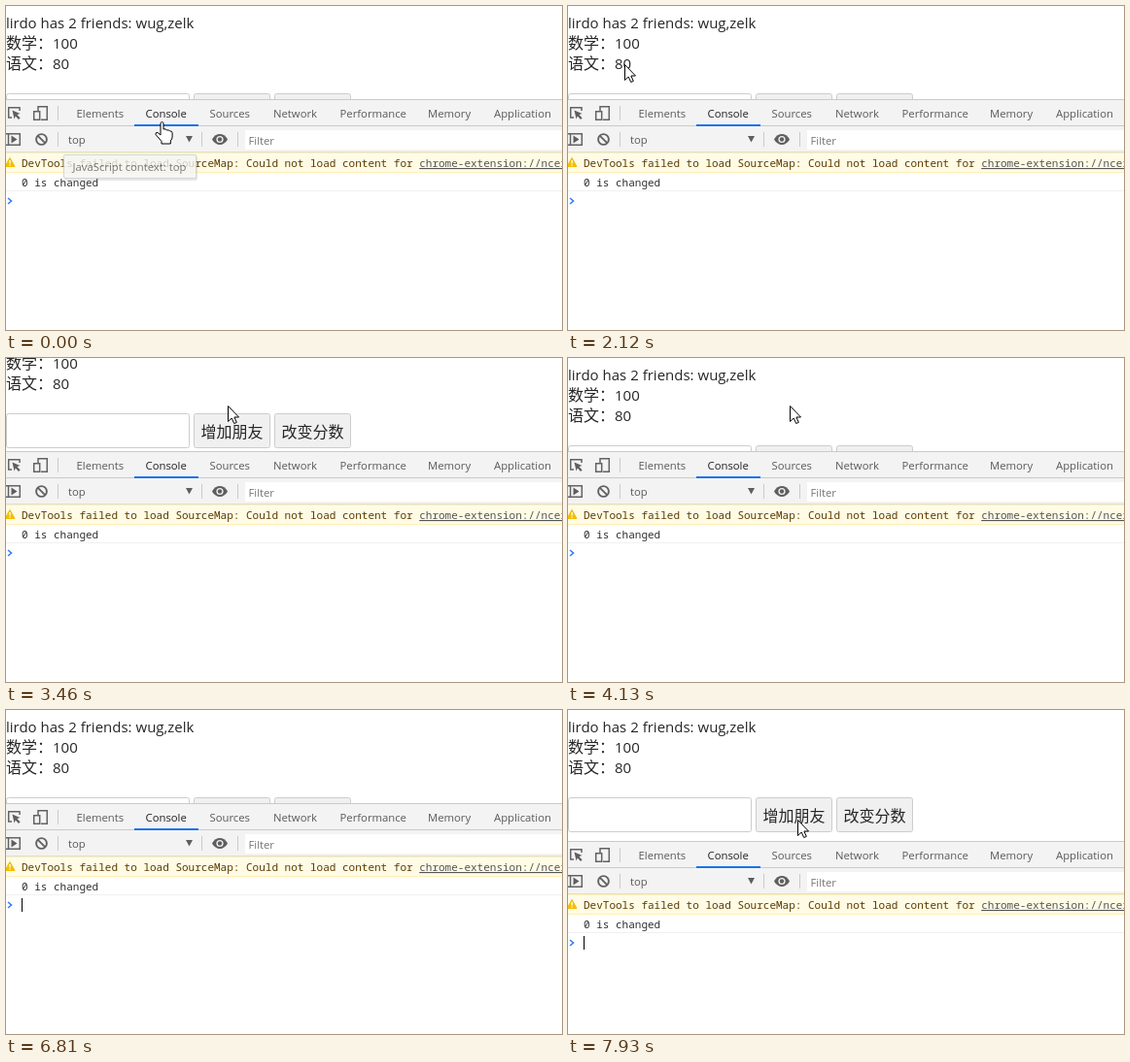
An HTML page that plays this animation: 572 by 334 pixels, repeating every 8 s.

```html
<!DOCTYPE html>
<html lang="zh-CN">
<head>
<meta charset="utf-8">
<title>Console demo</title>
<style>
html, body { margin: 0; width: 100%; height: 100%; overflow: hidden; background: #fff; }
svg { display: block; width: 572px; height: 334px; }
text { white-space: pre; }

.page { font: 15px "Open Sans", sans-serif; fill: #262626; }
.cjk { font: 16px "Noto Sans CJK SC", "Noto Sans CJK", sans-serif; }
.ui { font: 11.3px "Open Sans", sans-serif; fill: #5a5a5a; }
.log { font: 11px "Noto Sans Mono", monospace; fill: #303030; }
.line { fill: none; stroke: #636363; stroke-width: 1.5; }
.field { fill: #fff; stroke: #ccc; }
.button { fill: #f0f0f0; stroke: #ccc; }

.scroll, .panel, .caret, .tip, .tab-app, .tab-perf, .mouse, .arrow, .hand, .beam {
  animation: 8s step-end infinite;
}
.scroll { animation-name: scroll; }
.panel { animation-name: panel; }
.caret { animation-name: caret; }
.tip { animation-name: tip; }
.tab-app { animation-name: tab-app; }
.tab-perf { animation-name: tab-perf; }
.mouse { animation-name: mouse; }
.arrow { animation-name: arrow; }
.hand { animation-name: hand; }
.beam { animation-name: beam; }

@keyframes scroll {
  0%, 51.625% { transform: translateY(0); }
  41.625% { transform: translateY(-15px); }
  43.25% { transform: translateY(-33px); }
  45.125% { transform: translateY(-36px); }
  50.125% { transform: translateY(-14px); }
}
@keyframes panel {
  0% { transform: translateY(0); }
  87% { transform: translateY(21px); }
  88.875% { transform: translateY(37px); }
  90.5%, 100% { transform: translateY(39px); }
}
@keyframes caret {
  0%, 90.5% { visibility: hidden; }
  85.125%, 97.625%, 100% { visibility: visible; }
}
@keyframes tip {
  0% { opacity: .8; transform: none; }
  1.5% { opacity: .45; transform: none; }
  3% { opacity: .18; transform: none; }
  4.5% { opacity: 0; transform: translateY(4px); }
  29.625% { opacity: .5; transform: translateY(4px); }
  31% { opacity: .9; transform: translateY(4px); }
  32.875%, 100% { opacity: 0; transform: none; }
}
@keyframes tab-app {
  0%, 69.125%, 95.75% { fill: #5a5a5a; }
  67.25%, 94.25% { fill: #333; }
}
@keyframes tab-perf {
  0%, 97.625% { fill: #5a5a5a; }
  95.75% { fill: #333; }
}
@keyframes mouse {
  0% { transform: translate(160px, 119px); }
  1.5% { transform: translate(152px, 110px); }
  3% { transform: translate(122px, 74px); }
  4.5% { transform: translate(105px, 57px); }
  6.375% { transform: translate(103px, 56px); }
  8.25% { transform: translate(103px, 61px); }
  9.75% { transform: translate(102px, 67px); }
  14.75% { transform: translate(93px, 67px); }
  16.25% { transform: translate(70px, 66px); }
  18.125% { transform: translate(48px, 52px); }
  19.625% { transform: translate(33px, 41px); }
  23.5% { transform: translate(40px, 26px); }
  25% { transform: translate(58px, 60px); }
  26.625% { transform: translate(72px, 112px); }
  28.125% { transform: translate(77px, 134px); }
  29.625% { transform: translate(78px, 138px); }
  31% { transform: translate(76px, 188px); }
  32.875% { transform: translate(76px, 207px); }
  34.375% { transform: translate(135px, 196px); }
  36.25% { transform: translate(235px, 85px); }
  38.125% { transform: translate(228px, 49px); }
  62.125% { transform: translate(290px, 80px); }
  63.875% { transform: translate(328px, 89px); }
  65.75% { transform: translate(425px, 88px); }
  67.25% { transform: translate(530px, 110px); }
  94.25% { transform: translate(540px, 155px); }
  95.75% { transform: translate(309px, 162px); }
  97.625% { transform: translate(262px, 130px); }
  99.125%, 100% { transform: translate(236px, 113px); }
}
@keyframes arrow {
  0%, 31%, 69.125% { visibility: hidden; }
  3%, 36.25%, 94.25%, 100% { visibility: visible; }
}
@keyframes hand {
  0% { visibility: visible; }
  3%, 100% { visibility: hidden; }
}
@keyframes beam {
  0%, 36.25%, 100% { visibility: hidden; }
  31% { visibility: visible; }
}
</style>
</head>
<body>
<svg viewBox="0 0 572 334">
  <g class="page">
    <g class="scroll">
      <text x="0" y="23">lirdo has 2 friends: wug,zelk</text>
      <text x="0" y="44"><tspan class="cjk">数学：</tspan>100</text>
      <text x="0" y="65"><tspan class="cjk">语文：</tspan>80</text>
      <rect class="field" x=".5" y="90.5" width="188" height="35" rx="2"/>
      <rect class="button" x="193.5" y="90.5" width="78" height="35" rx="2"/>
      <rect class="button" x="276.5" y="90.5" width="78" height="35" rx="2"/>
      <text class="cjk" x="200.5" y="115">增加朋友</text>
      <text class="cjk" x="283.5" y="115">改变分数</text>
    </g>
  </g>

  <g class="panel">
    <path fill="#fff" d="M0 96h572v260H0z"/>
    <path fill="#f3f3f3" d="M0 96h572v55H0z"/>
    <path fill="#cacaca" d="M0 96h572v1H0zM0 123h572v1H0zM53 103h1v15h-1zM53 130h1v15h-1zM201 130h1v15h-1zM238 130h1v15h-1z"/>
    <path fill="#fff" d="M246 128h326v20H246z"/>
    <path fill="#ddd" d="M0 150h572v1H0z"/>
    <path fill="#1a73e8" d="M132 122h66v2h-66z"/>

    <g class="line">
      <path d="M6 115H2.7V104.7H14V108"/>
      <path d="M33 108V103.7H42.3V117.3H36M28.7 108.7h6v8.6h-6z"/>
      <path d="M-1 131.7H14.3V143.3H-1M2.5 131.7V143.3"/>
      <g stroke-width="1.9">
        <circle cx="36.5" cy="137.5" r="5.4"/>
        <path d="M32.6 133.6l7.8 7.8"/>
      </g>
    </g>
    <g fill="#5e5e5e">
      <path d="M6.5 107.5l8 3.4-3.1 1.2 3.2 3.4-1.6 1.5-3.2-3.4-1.3 3z"/>
      <path d="M5.5 133.5l6 4-6 4z"/>
      <path d="M185 134h7l-3.5 6.5z"/>
      <path d="M212 137.5c4-7.3 12-7.3 16 0c-4 7.3-12 7.3-16 0z"/>
    </g>
    <circle cx="220" cy="137.5" r="3.6" fill="#f3f3f3"/>
    <circle cx="220" cy="137.5" r="2.2" fill="#5e5e5e"/>

    <g class="ui">
      <text x="72.5" y="115">Elements</text>
      <text x="143.5" y="115" fill="#222">Console</text>
      <text x="209.5" y="115">Sources</text>
      <text x="275" y="115">Network</text>
      <text class="tab-perf" x="343.5" y="115">Performance</text>
      <text x="434" y="115">Memory</text>
      <text class="tab-app" x="502" y="115">Application</text>
      <text x="64" y="142">top</text>
      <text x="249.5" y="143" fill="#757575">Filter</text>
    </g>

    <path fill="#fffbe5" d="M0 151h572v21H0z"/>
    <path fill="#fff0b3" d="M0 151h572v1H0zM0 171h572v1H0z"/>
    <path fill="#f0f0f0" d="M0 190h572v1H0z"/>
    <path d="M4 156.500l5 9H-1z" fill="#f4bd00" stroke="#f4bd00" stroke-linejoin="round"/>
    <path fill="#fff" d="M3.400 159h1.300v3.500H3.400zM3.400 163.500h1.300v1.300H3.400z"/>
    <g class="log">
      <text x="16" y="166" fill="#5c3c00">DevTools failed to load SourceMap: Could not load content for <tspan fill="#545454" text-decoration="underline">chrome-extension://ncer</tspan></text>
      <text x="16" y="186">0 is changed</text>
    </g>
    <path d="M2 198l3.5 3-3.5 3" fill="none" stroke="#367cf1" stroke-width="1.6"/>
    <path class="caret" fill="#000" d="M16 194h1v14h-1z"/>
  </g>

  <g class="tip">
    <rect x="60" y="154" width="137" height="26" rx="2" fill="#000" opacity=".12"/>
    <rect x="59.5" y="153.5" width="136" height="24" rx="1.500" fill="#f5f5f5" stroke="#ccc"/>
    <text class="ui" x="68.5" y="170">JavaScript context: top</text>
  </g>

  <g class="mouse">
    <path class="arrow" d="M.5.5V16.500L4.200 13 6.700 18.500 9.300 17.400 6.900 12H11.500Z" fill="#fff" stroke="#000"/>
    <path class="hand" d="M-1 1.500q1.500-2 3 0V8q3-.8 3.300 1 3-.6 3.300 1 2.500-.3 2.500 1.800V16q0 2-1.800 4v3H0v-2.500L-6 13.500q-.5-2.500 2-2L-1 14z" fill="#fff" stroke="#000" stroke-linejoin="round"/>
    <path class="beam" d="M-3.500-7.500H-1L0-6.500 1-7.500H3.500M0-6.500V6.500M-3.500 7.500H-1L0 6.500 1 7.500H3.500" fill="none" stroke="#000" stroke-width="1.400"/>
  </g>
</svg>
</body>
</html>
```
